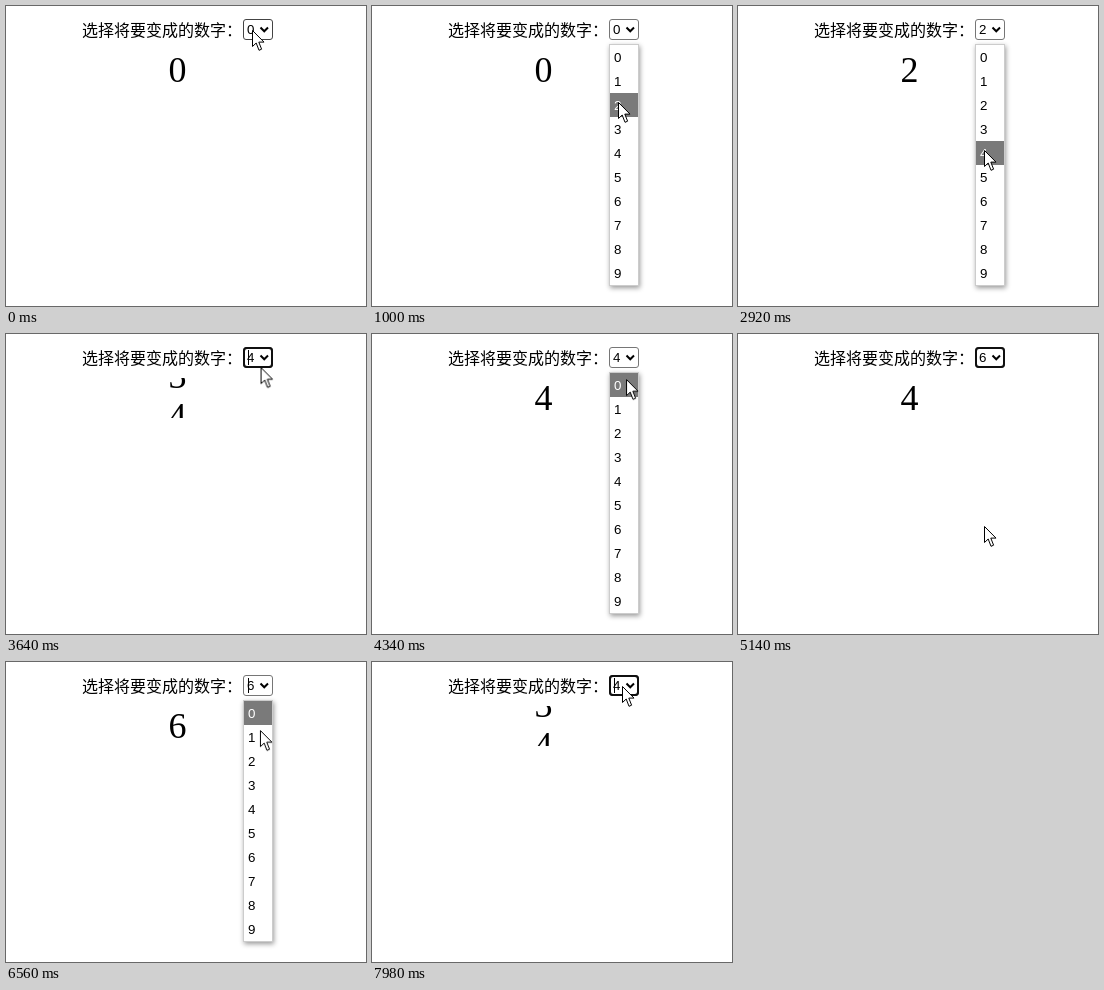
Recreate the animation shown at these times as an HTML page. Size 360 by 300 pixels, loop 8000 ms.

```html
<!DOCTYPE html>
<html lang="zh-CN">
<head>
<meta charset="utf-8">
<title>数字滚动</title>
<style>
  html, body { margin: 0; width: 100%; height: 100%; overflow: hidden; background: #fff; }
  svg { display: block; width: 360px; height: 300px; }
  .label { font: 16px "Noto Sans CJK SC", "Noto Sans CJK", sans-serif; }
  .ui { font: 13.333px "Liberation Sans", Arial, sans-serif; }
  .reel { font: 36px "Liberation Serif", Times, serif; }
  .panel { fill: #fff; filter: drop-shadow(1px 2px 2.5px rgba(0, 0, 0, .4)); }
</style>
</head>
<body>
<svg viewBox="0 0 360 300">
  <defs><clipPath id="window"><rect x="150" y="44" width="44" height="40"/></clipPath></defs>
  <text class="label" x="76" y="30">选择将要变成的数字：</text>

  <g clip-path="url(#window)"><g id="reel" class="reel"></g></g>

  <g class="ui">
    <rect id="thin" x="237.5" y="13.5" width="29" height="20" rx="2.5" fill="#fff"/>
    <rect id="ring" x="238" y="14" width="28" height="19" rx="3" fill="#fff" stroke="#101010" stroke-width="2"/>
    <text id="value" x="241" y="28"></text>
    <path d="M254.5 21.5l3.75 3.75 3.75-3.75" fill="none" stroke="#000" stroke-width="2"/>
    <rect id="caret" y="16" width="1" height="15"/>
  </g>

  <g id="list" class="ui">
    <rect class="panel" x="237" y="38" width="30" height="242"/>
    <rect x="237.5" y="38.5" width="29" height="241" fill="#fff" stroke="#ccc"/>
    <rect id="mark" x="238" width="28" height="24" fill="#7a7a7a"/>
  </g>

  <g id="pointer">
    <path d="M.5 .5V16.5L4.2 13L7 20.3L9.6 19.2L6.8 12.1H12Z" fill="#fff" stroke="#000"/>
  </g>
</svg>
<script>
  const LOOP = 8000, ROW = 40, ITEM = 24, LIST_TOP = 39, SPAN = 9000, BLINK = 530;
  const $ = id => document.getElementById(id);

  // one round: open the list, reach an item, pick it, roll the digit, rest the pointer at home
  const rounds = [
    { open: 200, reach: 1000, pick: 1400, roll: 1460, digit: 2, home: [254, 29] },
    { open: 2320, reach: 2920, pick: 3120, roll: 3170, digit: 4, home: [255, 27] },
    { open: 4040, reach: 4740, pick: 5140, roll: 5195, digit: 6, home: [258, 29] },
    { open: 6060, reach: 7030, pick: 7360, roll: 7280, digit: 4, home: [250, 24] }
  ];

  function addText(parent, text, x, y) {
    const el = document.createElementNS("http://www.w3.org/2000/svg", "text");
    el.textContent = text;
    el.setAttribute("x", x);
    el.setAttribute("y", y);
    parent.append(el);
    return el;
  }

  for (let i = 0; i < 15; i++) addText($("reel"), i % 10, 162.5, 76 + i * ROW);
  const items = Array.from({ length: 10 }, (_, i) => addText($("list"), i, 242, 56 + i * ITEM));

  const key = (t, [x, y], easing = "linear") =>
    ({ offset: t / SPAN, transform: `translate(${x}px, ${y}px)`, easing });

  function timeline(el, frames) {
    const end = { ...frames.at(-1), offset: 1 };
    const anim = el.animate([...frames, end], { duration: SPAN, fill: "both" });
    anim.pause();
    return anim;
  }

  // the reel only rolls upwards, passing 9 to reach a smaller digit
  let row = 0, home = [246, 24];
  const rolls = [key(0, [0, 0])], moves = [key(0, home)];
  for (const r of rounds) {
    const next = row + (r.digit - row + 10) % 10;
    rolls.push(key(r.roll, [0, -row * ROW], "ease"), key(r.roll + 1000, [0, -next * ROW]));
    row = next;

    const spot = [246, LIST_TOP + r.digit * ITEM + 9];
    moves.push(
      key(r.open + 180, home, "ease-in-out"), key(r.reach, spot),
      key(r.pick, spot, "ease-in-out"), key(r.pick + 620, r.home)
    );
    home = r.home;
  }
  const anims = [timeline($("reel"), rolls), timeline($("pointer"), moves)];

  const show = (el, on) => el.setAttribute("visibility", on ? "visible" : "hidden");

  // the picture advances in 100 ms ticks, slipping 20 ms during each roll
  function snap(t) {
    const slip = 20 * rounds.filter(r => t >= r.pick + 420).length;
    return Math.max(0, Math.floor((t - slip) / 100) * 100 + slip);
  }

  function draw(time) {
    const t = snap(time);
    for (const a of anims) a.currentTime = t;
    const y = new DOMMatrix(getComputedStyle($("pointer")).transform).m42;

    const picked = rounds.findLast(r => r.pick <= t);
    const open = rounds.some(r => t >= r.open && t < r.pick);
    const value = picked ? picked.digit : 0;
    $("value").textContent = value;
    $("thin").setAttribute("stroke", y < 34 ? "#444" : "#767676");
    show($("ring"), picked && !open);
    show($("list"), open);

    // the highlight trails the pointer by a few pixels
    const item = y < LIST_TOP ? value : Math.max(0, Math.floor((y - LIST_TOP - 7) / ITEM));
    $("mark").setAttribute("y", LIST_TOP + item * ITEM);
    items.forEach((el, i) => el.setAttribute("fill", i === item ? "#fff" : "#000"));

    show($("caret"), (t + 930) % (2 * BLINK) < BLINK);
    $("caret").setAttribute("x", picked ? 242 : 249);
  }

  const start = performance.now();
  function tick() {
    draw((performance.now() - start) % LOOP);
    requestAnimationFrame(tick);
  }
  tick();
</script>
</body>
</html>
```
